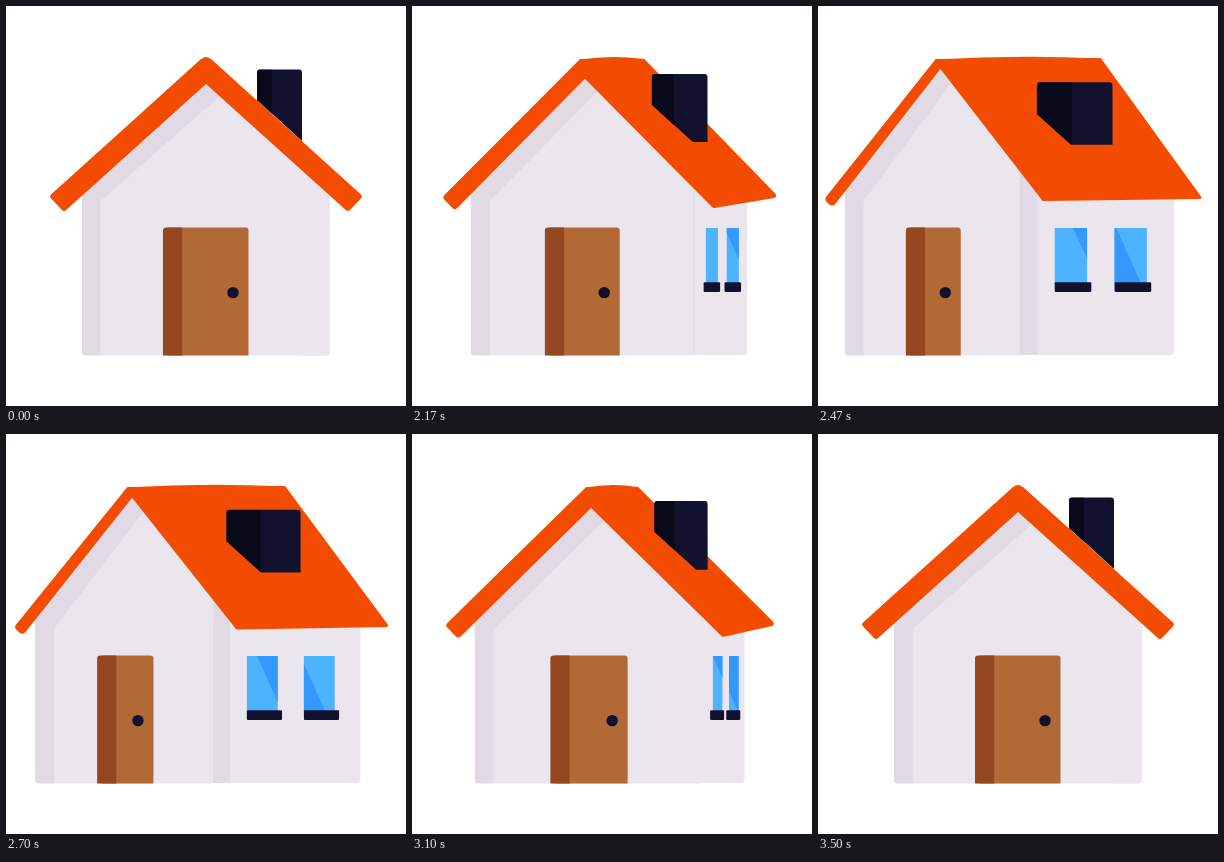
These frames come from a looping animation (400x400 px, 3520 ms). An HTML page with a canvas:

```html
<!DOCTYPE html>
<html>
<head>
<meta charset="utf-8">
<style>
html, body { margin: 0; width: 100%; height: 100%; overflow: hidden; background: #fff; }
canvas { display: block; width: 400px; height: 400px; }
</style>
</head>
<body>
<canvas id="stage" width="400" height="400"></canvas>
<script>
const ctx = document.getElementById('stage').getContext('2d');
const LOOP = 3520, STEP = 25;
const COLOR = {
  roof: '#f34c00', wall: '#ebe6ed', wallShade: '#e1dae4',
  door: '#b16936', doorShade: '#954720',
  navy: '#12122f', navyShade: '#090a19',
  glass: '#4db3ff', glassShade: '#3399ff'
};

const mix = (a, b, p) => a + (b - a) * p;

// Cubic bezier easing with end handles at (x1, 0) and (x2, 1).
function ease(x, x1, x2) {
  let lo = 0, hi = 1, s = 0.5;
  for (let i = 0; i < 24; i++) {
    s = (lo + hi) / 2;
    const r = 1 - s;
    if (3 * x1 * s * r * r + 3 * x2 * s * s * r + s * s * s < x) lo = s; else hi = s;
  }
  return s * s * (3 - 2 * s);
}

// 0 = seen from the front, 1 = fully turned.
function turnAt(time) {
  const t = Math.floor((time + 5) / STEP) * STEP;
  if (t <= 2000 || t >= 3500) return 0;
  return t < 2500 ? ease((t - 2000) / 500, 0.4, 0.4) : 1 - ease((t - 2500) / 1000, 0.59, 0.4);
}

// Traces a closed polygon of [x, y, corner radius].
function trace(points) {
  const [lx, ly] = points[points.length - 1], [fx, fy] = points[0];
  ctx.beginPath();
  ctx.moveTo((lx + fx) / 2, (ly + fy) / 2);
  points.forEach(([x, y, r = 0], i) => {
    const [nx, ny] = points[(i + 1) % points.length];
    if (r) ctx.arcTo(x, y, nx, ny, r); else ctx.lineTo(x, y);
  });
  ctx.closePath();
}

function poly(color, points) {
  trace(points);
  ctx.fillStyle = color;
  ctx.fill();
}

function box(color, x0, y0, x1, y1, radii = 0) {
  ctx.beginPath();
  ctx.roundRect(x0, y0, x1 - x0, y1 - y0, radii);
  ctx.fillStyle = color;
  ctx.fill();
}

function clipped(draw, makePath) {
  ctx.save();
  makePath();
  ctx.clip();
  draw();
  ctx.restore();
}

function drawWalls(p) {
  const left = mix(76, 26.7, p), corner = mix(324, 201, p), right = mix(324, 356, p);
  const bottom = 349.6, apex = [mix(200, 122, p), mix(70, 58, p)];
  const eaveL = mix(182, 177, p), eaveR = mix(182, 145, p);
  box(COLOR.wall, corner - 30, 185, right, p ? 349 : bottom, [0, 0, 4, 0]);
  const front = [[left, bottom, 4], [left, eaveL], apex, [corner, eaveR], [corner, bottom, 4]];
  poly(COLOR.wall, front);
  const inner = left + 18.7;
  clipped(() => poly(COLOR.wallShade, [
    [left, bottom], [left, eaveL], apex,
    [mix(213, 133.5, p), mix(91, 77, p)], [inner, 195], [inner, bottom]
  ]), () => trace(front));
  const shade = 18 * Math.max(0, (p - 0.28) / 0.72);
  if (shade) box(COLOR.wallShade, corner, eaveR, corner + shade, 349);
}

// The slanted reflection edge crosses the pane; shadeSide is 1 to darken its right, -1 its left.
function drawWindow(left, p, edge, shadeSide) {
  const top = 222, bottom = 277, width = 1.2 + 31.2 * p;
  const slant = (bottom - top) / 2.25, far = left + 100 * shadeSide;
  box(COLOR.glass, left, top, left + width, bottom);
  clipped(() => poly(COLOR.glassShade, [
    [left + edge, top], [left + edge + slant, bottom], [far, bottom], [far, top]
  ]), () => {
    ctx.beginPath();
    ctx.rect(left, top, width, bottom - top);
  });
  const sill = left - Math.max(0, Math.min(4.5 - 6.5 * p, 1.8 + 6 * p));
  box(COLOR.navy, sill, 276.3, sill + Math.min(5.7 + 31 * p, 3.9 + 40 * p), 286, 1);
}

function drawWindows(p) {
  if (!p) return;
  const early = p < 0.5;
  const near = 172 * (p - (early ? 0.27 : 0.89));
  const far = early ? 172 * (p - 0.36) : 110 * (p - 0.89) - 10;
  drawWindow(324.5 - 88 * p, p, near, 1);
  drawWindow(324.5 - 28 * p, p, far, early ? 1 : -1);
}

function drawDoor(p) {
  const left = 157 - 69.3 * p, right = 242.5 - 100 * p, split = left + 19.2;
  box(COLOR.door, left + 5, 221.5, right, 349.6, [0, 3, 0, 0]);
  box(COLOR.doorShade, left, 221.5, split, 349.6, [3, 0, 0, 0]);
  ctx.beginPath();
  ctx.arc(227 - 100 * p, 286.6, 5.7, 0, Math.PI * 2);
  ctx.fillStyle = COLOR.navy;
  ctx.fill();
}

function drawRoof(p) {
  const ridgeL = mix(195, 117.5, p), ridgeR = mix(205, 283, p), ridgeY = 53;
  poly(COLOR.roof, [
    [ridgeL, ridgeY], [ridgeR, ridgeY - p],
    [mix(357, 385, p), mix(190.3, 193, p), mix(3, 1.5, p)],
    [mix(342, 224.5, p), mix(206, 195, p), mix(3, 1, p)],
    [mix(200, 122.2, p), mix(78, 63, p)],
    [mix(58, 14.5, p), mix(206, 201.5, p), mix(3, 4, p)],
    [mix(43, 6, p), mix(190.3, 193.5, p), mix(3, 4, p)]
  ]);
  ctx.beginPath();
  ctx.moveTo(ridgeL, ridgeY + 0.5);
  ctx.quadraticCurveTo(200, 48.6, ridgeR, ridgeY + 0.5 - p);
  ctx.fill();
}

function drawChimney(p) {
  const left = 251 - 32.2 * p, right = 296 - 1.5 * p, top = 63.5 + 12.8 * p;
  const bottom = 134.6 + 4.2 * p;
  const shape = [
    [left, top, 3], [right, top, 3], [right, bottom],
    [295.5 - 42.5 * p, bottom], [left, 94 + 14 * p]
  ];
  poly(COLOR.navy, shape);
  clipped(() => box(COLOR.navyShade, left, top, 266 - 12 * p, bottom), () => trace(shape));
}

function frame(now) {
  const p = turnAt(now % LOOP);
  ctx.fillStyle = '#fff';
  ctx.fillRect(0, 0, 400, 400);
  drawWalls(p);
  drawWindows(p);
  drawDoor(p);
  drawRoof(p);
  drawChimney(p);
}

let start = null;
function tick(now) {
  if (start === null) start = now;
  frame(now - start);
  requestAnimationFrame(tick);
}
frame(0);
requestAnimationFrame(tick);
</script>
</body>
</html>
```
